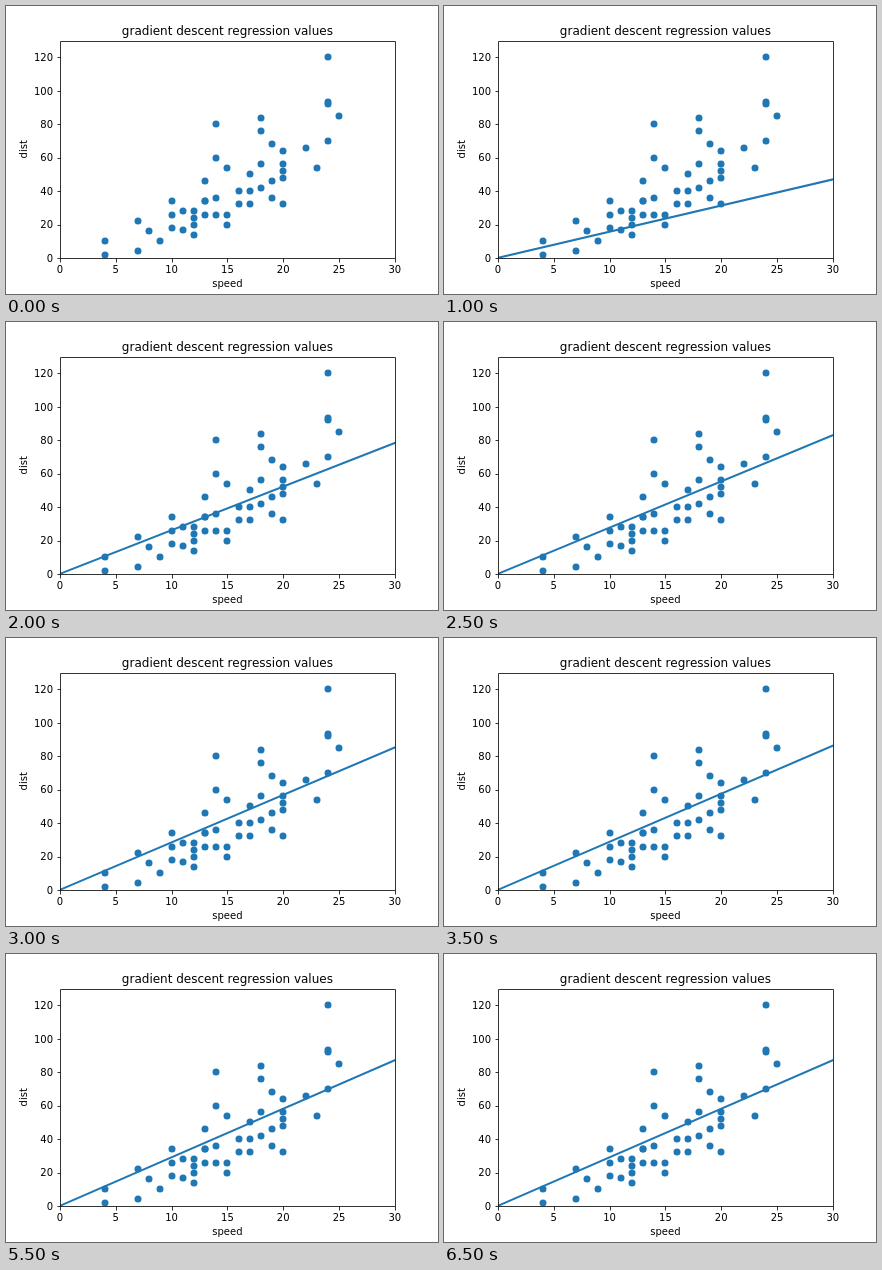
Animation, 432 px wide and 288 px high, one loop 7500 ms. Source, as an HTML page:

```html
<!DOCTYPE html>
<html lang="en">
<head>
<meta charset="utf-8">
<title>gradient descent regression values</title>
<style>
  html, body { margin: 0; width: 100%; height: 100%; overflow: hidden; background: #fff; }
  svg { display: block; }
  text { font: 10px "DejaVu Sans", sans-serif; fill: #000; text-anchor: middle; }
  .title { font-size: 12px; }
  .axis { fill: none; stroke: #000; stroke-width: .8; }
  .dot { fill: #1f77b4; }
  .fit { stroke: #1f77b4; stroke-width: 2; stroke-linecap: square; }
</style>
</head>
<body>
<svg id="chart" width="432" height="288" viewBox="0 0 432 288">
  <clipPath id="area"><rect x="54" y="35" width="335" height="217"/></clipPath>
  <g id="plot" clip-path="url(#area)"></g>
  <g id="axes"></g>
</svg>
<script>
const LOOP = 7500, STEP = 500, LAST = 12, RATE = 0.002;

// stopping distances grouped by speed
const cars = {
  4: [2, 10], 7: [4, 22], 8: [16], 9: [10], 10: [18, 26, 34], 11: [17, 28],
  12: [14, 20, 24, 28], 13: [26, 34, 34, 46], 14: [26, 36, 60, 80],
  15: [20, 26, 54], 16: [32, 40], 17: [32, 40, 50], 18: [42, 56, 76, 84],
  19: [36, 46, 68], 20: [32, 48, 52, 56, 64], 22: [66], 23: [54],
  24: [70, 92, 93, 120], 25: [85]
};
const points = Object.entries(cars).flatMap(([s, ds]) => ds.map(d => [+s, d]));

const px = x => 54 + x / 30 * 334.8;
const py = y => 252 - y / 130 * 217.44;
const plot = document.getElementById('plot');
const axes = document.getElementById('axes');

function add(parent, tag, attrs, text = '') {
  const el = document.createElementNS('http://www.w3.org/2000/svg', tag);
  for (const k in attrs) el.setAttribute(k, attrs[k]);
  el.textContent = text;
  parent.append(el);
  return el;
}
const label = (text, attrs) => add(axes, 'text', attrs, text);
const stroke = d => add(axes, 'path', { class: 'axis', d });

for (const [s, d] of points)
  add(plot, 'circle', { class: 'dot', cx: Math.round(px(s)), cy: Math.round(py(d)), r: 3.5 });

stroke('M54.5 35.5H389.5V252.5H54.5Z');
for (let x = 0; x <= 30; x += 5) {
  stroke(`M${Math.round(px(x)) + .5} 252.5v4`);
  label(x, { x: px(x), y: 267 });
}
for (let y = 0; y <= 120; y += 20) {
  stroke(`M54.5 ${Math.round(py(y)) + .5}h-3`);
  label(y, { x: 47, y: Math.round(py(y) + 3.8), style: 'text-anchor:end' });
}
label('speed', { x: 221.4, y: 281 });
label('dist', { transform: 'translate(21 143.3) rotate(-90)' });
label('gradient descent regression values', { class: 'title', x: 221.4, y: 29 });

// one descent step on the mean squared error
function descend([m, b]) {
  let gm = 0, gb = 0;
  for (const [x, y] of points) {
    const r = y - m * x - b;
    gm += r * x;
    gb += r;
  }
  const k = RATE / points.length;
  return [m + k * gm, b + k * gb];
}
const fits = [[0.05, 0]];
while (fits.length < LAST) fits.push(descend(fits[fits.length - 1]));

const line = add(plot, 'line', { class: 'fit', x1: px(0), x2: px(30) });

function draw() {
  const n = Math.min(Math.floor(performance.now() % LOOP / STEP), LAST);
  line.style.display = n ? '' : 'none';
  if (n) {
    const [m, b] = fits[n - 1];
    line.setAttribute('y1', py(b));
    line.setAttribute('y2', py(30 * m + b));
  }
  requestAnimationFrame(draw);
}
draw();
</script>
</body>
</html>
```
